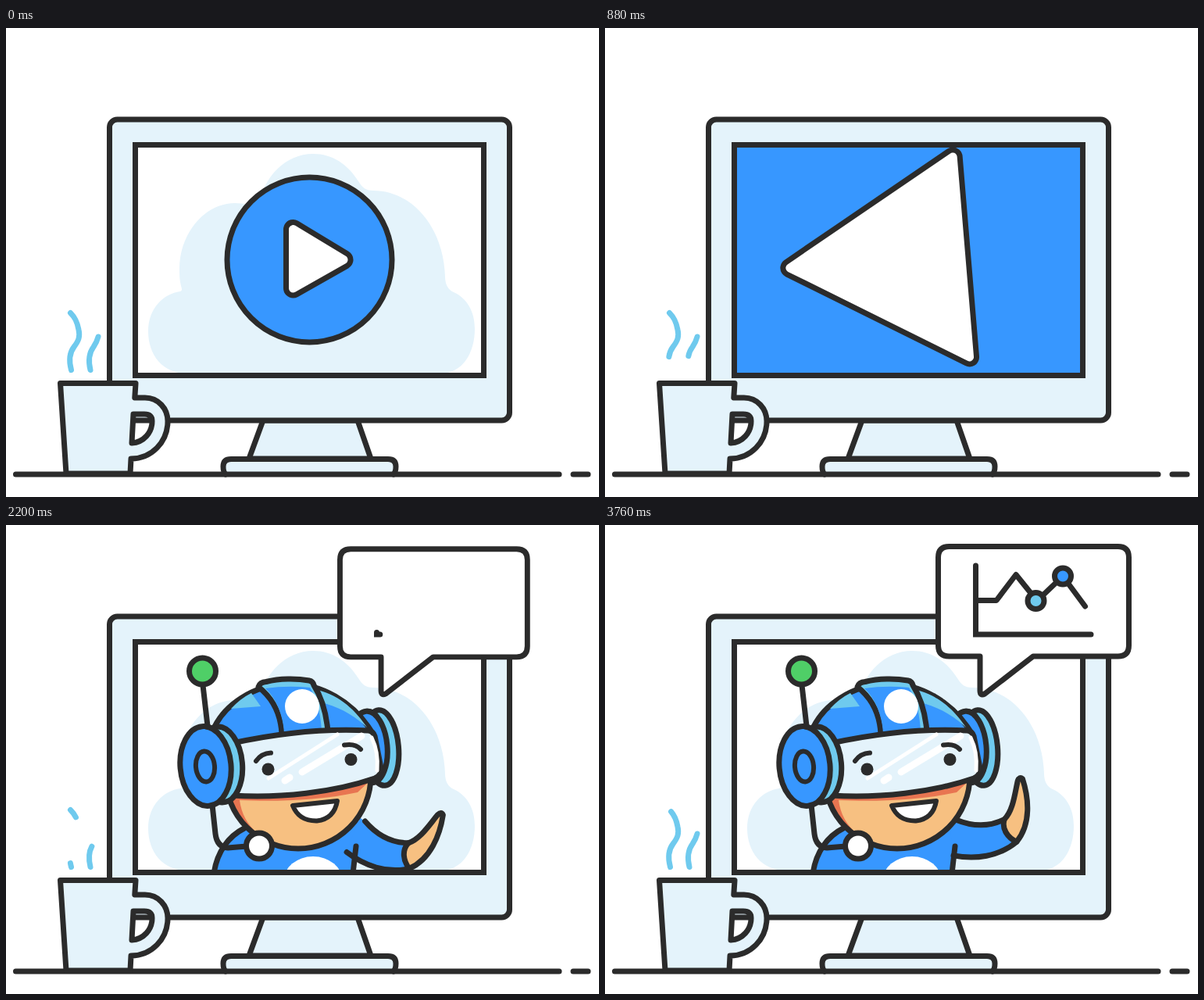
Write an HTML page that moves like this. It is 759 by 600 pixels and loops after 3800 ms.

```html
<!DOCTYPE html>
<html lang="en">
<head>
<meta charset="utf-8">
<title>Video call</title>
<style>
  html, body { margin: 0; height: 100%; overflow: hidden; background: #fff; }
  svg { display: block; width: 759px; height: 600px; }
  .ink { stroke: #2b2b2b; stroke-width: 7; stroke-linecap: round; stroke-linejoin: round; }
  .thin { stroke-width: 6; }
  .line { fill: none; }
  .pale { fill: #e4f3fb; }
  .blue { fill: #3797ff; }
  .sky { fill: #6fcaee; }
  .skin { fill: #f7c081; }
  .white { fill: #fff; }
  .dark { fill: #2b2b2b; }
  .steam { fill: none; stroke: #6fcaee; stroke-width: 7; stroke-linecap: round; }
  .glare { stroke: #fff; stroke-linecap: round; }
</style>
</head>
<body>
<svg viewBox="0 0 759 600">
  <defs>
    <clipPath id="screen"><rect x="166" y="150" width="445" height="294"/></clipPath>
    <path id="steamA" pathLength="80" d="M83.5 437.5C81 428 80 417 87 408C93 400 95 395 93 386C91 375 88 370 82.5 364.5"/>
    <path id="steamB" pathLength="47" d="M108 437.5C105 425 106 416 112 408C116 402 117 399 118 395"/>
  </defs>

  <!-- monitor -->
  <path class="ink pale" d="M329 502H450L467 551H311Z"/>
  <path class="ink pale" d="M281 571Q278 568 278 561Q278 551.500 288 551.500H489Q499 551.500 499 561Q499 568 496 571"/>
  <rect class="ink pale" x="132.500" y="117" width="512" height="385" rx="10"/>
  <rect class="white" x="165" y="149" width="446" height="295"/>

  <g clip-path="url(#screen)">
    <path class="pale" d="M232 442C200 442 182 418 182 388C182 358 202 340 223 337C226 336 225 333 224 330C222 322 222 315 222 308C222 262 255 224 293 224C304 224 314 226 323 230C329 190 358 161 393 161C418 161 437 174 451 196C456 204 460 208 470 208C520 208 560 255 562 318C562 328 566 335 573 338C590 346 600 362 600 385C600 415 585 442 556 442Z"/>

    <g id="play">
      <circle id="disc" class="ink blue" cx="388.500" cy="296.500"/>
      <polygon id="arrowEdge" fill="#2b2b2b" stroke="#2b2b2b" stroke-width="25" stroke-linejoin="round"/>
      <polygon id="arrow" fill="#fff" stroke="#fff" stroke-width="11" stroke-linejoin="round"/>
    </g>

    <g id="caller">
      <!-- body and arm -->
      <path class="blue" d="M266 446C270 418 285 398 305 388L440 370L452 380L448 411L444 520H266Z"/>
      <path class="ink line" d="M266 520V446C270 418 285 398 305 388"/>
      <ellipse class="white" cx="393" cy="456" rx="38" ry="32"/>
      <g id="arm">
        <path class="blue" d="M440 376L450 378C470 385 492 384 510 374L527 402C505 422 475 427 446 423Z"/>
        <path class="ink skin" d="M510 374C521 362 522 340 525 324Q527 318 531 321C540 345 545 378 527 402C515 397 507 386 510 374Z"/>
        <path class="ink line" d="M448 377C470 385 492 384 510 374M527 402C505 422 475 427 447 423"/>
      </g>
      <path class="ink line" d="M448 411L444 446"/>

      <!-- far earphone -->
      <ellipse class="ink sky" cx="481" cy="285" rx="21.500" ry="48.500" transform="rotate(-5 481 285)"/>
      <ellipse class="ink blue" cx="465" cy="284" rx="23" ry="46" transform="rotate(-5 465 284)"/>

      <!-- face -->
      <circle cx="374" cy="321" r="93" fill="#e87551"/>
      <path class="skin" d="M299 352C303 385 330 411 375 414C430 411 464 380 465 328L450 342C400 353 340 354 299 352Z"/>
      <circle class="ink line" cx="374" cy="321" r="93"/>
      <path class="ink thin white" d="M367 359L424 353Q420 376 398 378.500Q375 379 367 359Z"/>

      <!-- helmet -->
      <path class="ink blue" d="M266 260C280 230 315 206 357 203C402 201 446 226 470 268L297 285Z"/>
      <path class="sky" d="M288 235Q300 222 314 215L326 232Z"/>
      <path class="sky" d="M394 210C425 216 447 236 462 259C445 243 425 232 403 227Z"/>
      <path class="ink sky" d="M323 207Q325 201 333 200.500C350 196 372 196 388 199Q393 200 394 205C405 222 410 242 412 264L353 268C352 243 342 222 323 207Z"/>
      <path class="blue" d="M332 209Q360 205 389 208C399 224 403 244 404 264L356 267C355 245 347 223 332 209Z"/>
      <circle class="white" cx="379" cy="232" r="22"/>
      <path class="ink pale" d="M290 279C350 266 410 260 464 263Q470 264 472 270L480 311Q481 320 472 324C420 342 350 350 290 346Z"/>
      <path class="glare line" stroke-width="5" d="M336 324L424 268M468 272Q477 290 475 314"/>
      <path class="glare line" stroke-width="9" d="M379 316L455 270M357 327L363 323"/>
      <circle class="dark" cx="335.500" cy="312.500" r="8"/>
      <circle class="dark" cx="441.500" cy="300" r="8"/>
      <path class="ink thin line" d="M320 302Q327 292 339 291.500M433 281.500Q447 279 454 287"/>

      <!-- near earphone, aerial and microphone -->
      <path class="ink line" d="M252 205L258 257M264 358L268 395Q270 412 284 413L308 411"/>
      <circle cx="251.500" cy="187" r="17" class="ink" fill="#4fcf67"/>
      <ellipse class="ink sky" cx="274" cy="306.500" rx="28.500" ry="48.500" transform="rotate(-5 274 306.500)"/>
      <ellipse class="ink blue" cx="255.500" cy="308.500" rx="32.500" ry="51" transform="rotate(-5 255.500 308.500)"/>
      <ellipse class="ink line thin" cx="255" cy="309" rx="12" ry="19.500" transform="rotate(-5 255 309)"/>
      <circle class="ink white" cx="324" cy="410.500" r="16.500"/>
    </g>
  </g>
  <rect x="165.500" y="149.500" width="446" height="295" fill="none" stroke="#2b2b2b" stroke-width="7"/>

  <!-- desk, mug and steam -->
  <path class="ink line" d="M12.500 571H708M726 571H745"/>
  <path class="ink pale" fill-rule="evenodd" d="M69.500 454.500H166L164.800 473H178C195 473 207 487 207 503C207 530 186 551 160 551L159 570H77ZM163 494H177Q187 494 187 503C187 518 176 530 161 531Z"/>
  <use id="oldA" href="#steamA" class="steam"/>
  <use id="newA" href="#steamA" class="steam"/>
  <use id="oldB" href="#steamB" class="steam"/>
  <use id="newB" href="#steamB" class="steam"/>

  <!-- speech bubble with chart -->
  <path id="bubble" class="ink white" d="M440.500 27.500H656.500Q670.500 27.500 670.500 41.500V154Q670.500 168 656.500 168H548L486 216Q480 219 480 212V168H440.500Q426.500 168 426.500 154V41.500Q426.500 27.500 440.500 27.500Z"/>
  <path id="axes" class="ink line" style="stroke-linejoin:miter"/>
  <path id="graph" class="ink line" pathLength="100" d="M477 96.500H501L526 63.500L553 97L586 65.500L614.500 104"/>
  <circle id="dotA" class="ink sky" cx="551.500" cy="97" r="10.500"/>
  <circle id="dotB" class="ink blue" cx="586" cy="65.500" r="10.500"/>
</svg>
<script>
const LOOP = 3800;
const $ = id => document.getElementById(id);
const set = (id, attrs) => { for (const k in attrs) $(id).setAttribute(k, attrs[k]); };
const show = (id, on) => { $(id).style.display = on ? '' : 'none'; };

const progress = (t, from, to) => Math.min(1, Math.max(0, (t - from) / (to - from)));
const ease = (t, from, to) => (1 - Math.cos(Math.PI * progress(t, from, to))) / 2;

// Linear interpolation through [time, value] pairs
function track(t, ...keys) {
  const i = keys.findIndex(k => k[0] > t);
  if (i === 0) return keys[0][1];
  if (i < 0) return keys[keys.length - 1][1];
  const [t0, a] = keys[i - 1], [t1, b] = keys[i];
  return a + (b - a) * (t - t0) / (t1 - t0);
}

// Shows only the stretch of a stroke between two lengths
function stretch(id, from, to) {
  show(id, to > from);
  set(id, { 'stroke-dasharray': `${to - from} 999`, 'stroke-dashoffset': -from });
}

function scaleAt(id, s, x, y) {
  show(id, s > 0);
  set(id, { transform: `translate(${x} ${y}) scale(${s}) translate(${-x} ${-y})` });
}

function drawPlay(t) {
  const burst = Math.max(0, (t - 470) / 170) ** 3;
  show('play', t < 1170);
  set('play', { opacity: 1 - progress(t, 1090, 1170) });
  set('disc', { r: 105.5 + 141 * Math.min(burst, 4) });
  const size = 1 + 0.17 * burst, turn = 12.4 * burst * Math.PI / 180;
  const cos = Math.cos(turn) * size, sin = Math.sin(turn) * size;
  const cx = 388 - 2 * Math.min(burst, 1), cy = 296.5 - 2 * Math.min(burst, 1);
  const points = [[-20.5, -39], [-20.5, 36.5], [44, 0]]
    .map(([x, y]) => [cx + x * cos - y * sin, cy + x * sin + y * cos]).join(' ');
  set('arrow', { points });
  set('arrowEdge', { points });
}

function drawCaller(t) {
  const drop = 1 - ease(t, 1090, 1809);
  show('caller', t > 1150);
  set('caller', { transform: `translate(${18.6 * drop - 75.3 * drop * drop} ${280 * drop})` });
  const turn = track(t, [1720, 78], [2200, 29.5], [2480, 4], [2640, 0], [3200, 2.5]);
  set('arm', { transform: `rotate(${turn} 450 400)` });
}

function drawSteam(t) {
  stretch('oldA', track(t, [60, 0], [640, 9], [1360, 34], [1680, 48], [2200, 68], [2640, 79], [2800, 80]), 80);
  stretch('newA', 0, track(t, [2120, 0], [2200, 5], [2640, 30], [3400, 62], [3760, 77]));
  stretch('oldB', track(t, [60, 0], [640, 10], [1360, 36], [1680, 44], [1800, 47]), 47);
  stretch('newB', 0, track(t, [1300, 0], [1360, 6], [1680, 14], [2200, 28], [2640, 38], [3300, 47]));
}

function drawBubble(t) {
  scaleAt('bubble', track(t, [1800, 0], [2080, 1], [2200, 0.983], [2640, 0.985], [2840, 1]), 483, 216);
  const grow = ease(t, 2140, 2700);
  show('axes', grow > 0);
  set('axes', { d: `M474.500 ${140 - 88 * grow}V140H${474.5 + 147.5 * grow}` });
  stretch('graph', 0, 100 * ease(t, 2240, 2980));
  scaleAt('dotA', ease(t, 2900, 3080), 551.5, 97);
  scaleAt('dotB', ease(t, 3040, 3220), 586, 65.5);
}

const start = performance.now();
function frame() {
  const t = (performance.now() - start) % LOOP;
  drawPlay(t);
  drawCaller(t);
  drawSteam(t);
  drawBubble(t);
  requestAnimationFrame(frame);
}
frame();
</script>
</body>
</html>
```
